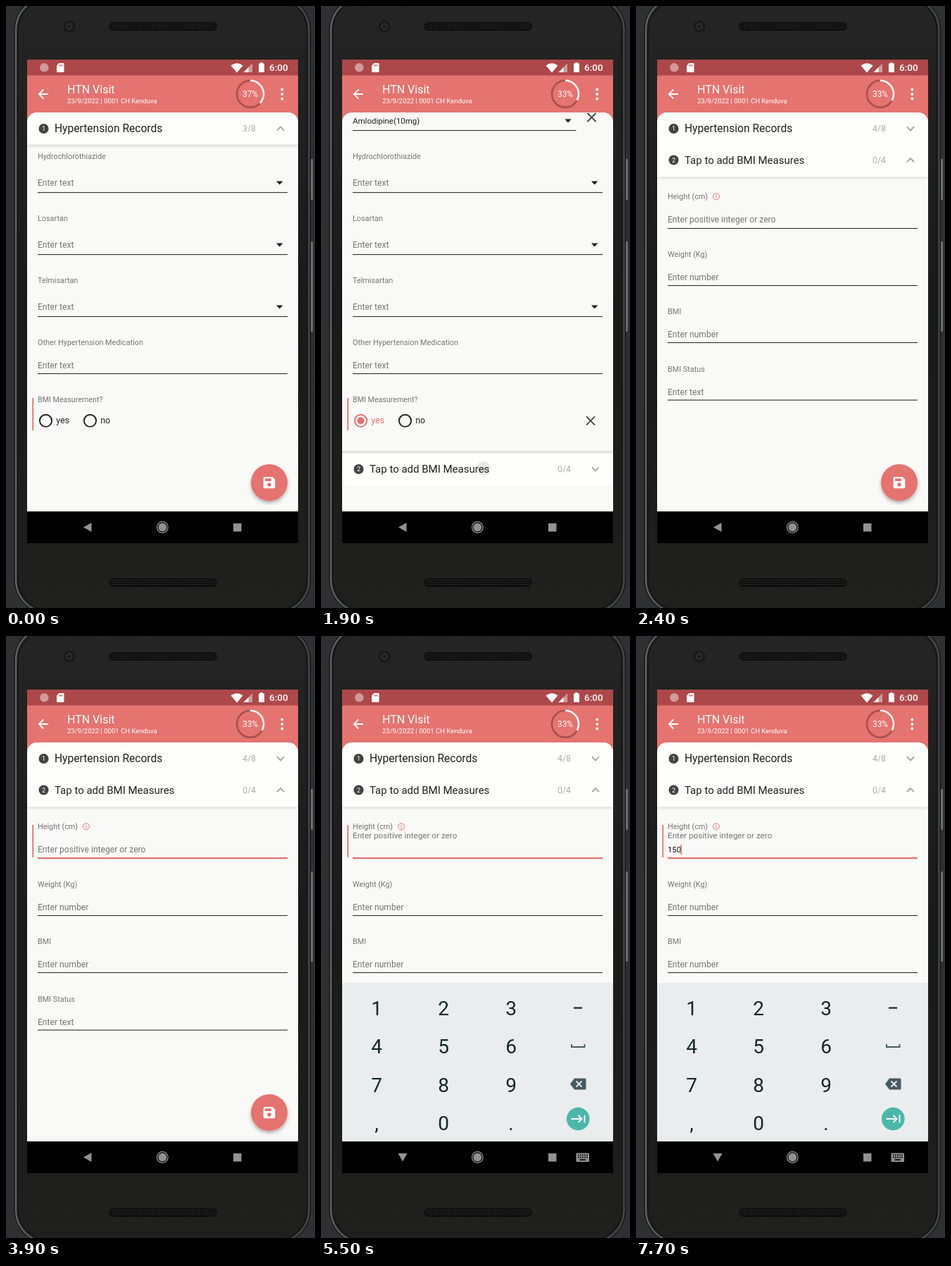
These frames come from a looping animation (439x854 px, 8 s). An HTML page:

```html
<!DOCTYPE html>
<html lang="en">
<head>
<meta charset="utf-8">
<title>Visit form</title>
<style>
  html, body { margin: 0; width: 100%; height: 100%; overflow: hidden; background: #2e3032; }
  svg { display: block; width: 100%; height: 100%; font-family: Roboto, Inter, sans-serif; }
</style>
</head>
<body>
<svg id="stage" viewBox="0 0 439 854"></svg>
<script>
const RED = '#e57370', INK = '#212121', GREY = '#757575', PALE = '#f9f9f8';

const text = (x, y, size, fill, str, extra = '') =>
  `<text x="${x}" y="${y}" font-size="${size}" fill="${fill}" ${extra}>${str}</text>`;
const rect = (x, y, w, h, fill, extra = '') =>
  `<rect x="${x}" y="${y}" width="${w}" height="${h}" fill="${fill}" ${extra}/>`;
const circle = (x, y, r, fill, extra = '') =>
  `<circle cx="${x}" cy="${y}" r="${r}" fill="${fill}" ${extra}/>`;
const path = (d, fill, extra = '') => `<path d="${d}" fill="${fill}" ${extra}/>`;
const line = (d, color, width, extra = '') =>
  path(d, 'none', `stroke="${color}" stroke-width="${width}" ${extra}`);
const group = (id, body, extra = '') => `<g id="${id}" ${extra}>${body}</g>`;
const mid = 'text-anchor="middle"';

const caret = (x, y) => path(`M${x - 4.7} ${y - 1.9}h9.4l-4.7 4.8z`, INK);
const cross = (x, y) => line(`M${x - 6} ${y - 6}l12 12m0 -12l-12 12`, '#424242', 1.8);
const rule = (y, to = 400) => rect(45, y, to - 45, 1.1, '#303030');
// Shadow cast below a header, with small rounded shoulders
const edge = y => path(`M30 ${y}h385v9q0-8-8-8H38q-8 0-8 8z`, '#fefefd') +
  rect(30, y, 385, 6, 'url(#shadow)');

function field(y, label, hint, hintY, lineY, id = '') {
  return text(45, y + 4, 10.85, GREY, label) +
    text(45, hintY + 4.2, 12.1, GREY, hint, id && `id="${id}"`) + rule(lineY);
}

function header(y, num, title, size, count) {
  return circle(53.5, y, 7, '#424242') + text(53.5, y + 3.2, 9, '#fff', num, mid) +
    text(69, y + 5.2, size, INK, title) +
    text(355, y + 4.3, 12.3, '#adadad', count, `id="count${num}" text-anchor="end"`) +
    line('M-5 2.6l5-5 5 5', '#a3a3a3', 1.9, `id="chev${num}"`);
}

function radio(x, name, label) {
  return circle(x, 588.3, 8.6, 'none', `id="${name}Ring" stroke="${INK}" stroke-width="1.9"`) +
    text(x + 14.7, 592.3, 12.3, INK, label, `id="${name}Text"`);
}

function speaker(y) {
  return rect(146, y, 154, 12, '#0d0d0d', 'rx="6"') + rect(147, y + 1, 152, 10, 'url(#mesh)', 'rx="5"');
}

function phone() {
  return rect(0, 0, 439, 854, '#2e3032') +
    rect(433, 217, 3, 58, '#6c6e70', 'rx="1"') + rect(433, 334, 3, 128, '#6c6e70', 'rx="1"') +
    rect(11.5, -14, 421.5, 876, '#101010', 'rx="48"') +
    rect(14, -12, 416.5, 872, 'url(#shell)', 'rx="46" stroke="url(#rim)" stroke-width="2.4"') +
    rect(17, -9, 410.5, 866, 'none', 'rx="43" stroke="#171717" stroke-width="2"') +
    circle(90, 29, 8.5, '#1a1a1a') + circle(90, 29, 5, '#2c2c2e') + circle(90, 29, 2.3, '#17181b') +
    speaker(23) + speaker(812);
}

function bars() {
  return rect(30, 76, 385, 23, '#ad484a') + rect(30, 98.5, 385, 85, RED) +
    circle(54.3, 87.3, 6.2, '#d29a9a') +
    path('M75.5 81h6a1 1 0 0 1 1 1v11a1 1 0 0 1-1 1H73a1 1 0 0 1-1-1V84.5z', '#fff') +
    line('M75.8 83v2.6m2-2.6v2.6m2-2.6v2.6', '#ad484a', 1) +
    path('M319.5 84.5q8.5-6.5 17 0l-8.5 10z', '#fff') +
    path('M350 81.5V94h-12.5z', '#d29a9b') + path('M344.5 87v7h-7z', '#fff') +
    path('M361.3 80h3.4v1.5h2.3V94h-8V81.5h2.3z', '#fff') +
    text(374, 92.3, 13.5, '#fff', '6:00', 'font-weight="500"') +
    line('M60 125H47m6.3-6.5l-6.5 6.5 6.5 6.5', '#fff', 1.8) +
    text(87, 123.6, 16, '#fff', 'HTN Visit') +
    text(87, 138.2, 9.5, '#fff', '23/9/2022 | 0001 CH Kenduva') +
    circle(347, 124.8, 19, 'none', 'stroke="#a9504f" stroke-width="2.6"') +
    circle(347, 124.8, 19, 'none', 'id="arc" pathLength="100" stroke="#fff" stroke-width="2.6" transform="rotate(-90 347 124.8)"') +
    text(347, 129, 11.9, '#fff', '', `id="percent" ${mid}`) +
    [118.5, 125, 131.5].map(y => circle(392.3, y, 2, '#fff')).join('');
}

function records() {
  const drugs = ['Hydrochlorothiazide', 'Losartan', 'Telmisartan'];
  return text(45, 166.8, 11.5, INK, 'Amlodipine(10mg)') + caret(351, 162.5) + rule(176, 362.5) + cross(384.5, 158) +
    drugs.map((d, i) => field(213 + 88 * i, d, 'Enter text', 250.5 + 88 * i, 264 + 88 * i) +
      caret(388.7, 250.5 + 88 * i)).join('') +
    field(477, 'Other Hypertension Medication', 'Enter text', 510, 521) +
    rect(37.3, 556, 1.8, 46, RED) + text(45, 562, 10.7, GREY, 'BMI Measurement?') +
    circle(56.5, 588.3, 19, RED, 'id="press"') +
    radio(56.5, 'yes', 'yes') + radio(119.5, 'no', 'no') +
    circle(56.5, 588.3, 5, RED, 'id="dot"') + group('clear', cross(383, 588.3)) +
    rect(30, 631, 385, 4, '#e3e3e2', 'id="split"');
}

function measures() {
  return edge(241) +
    field(270, 'Height (cm)', 'Enter positive integer or zero', 303, 315, 'hint') +
    circle(114, 270.3, 4.5, 'none', `stroke="${RED}" stroke-width="1"`) +
    line('M114 269.7v3m0-5v1.1', RED, 1) +
    field(351.5, 'Weight (Kg)', 'Enter number', 384.5, 396) +
    field(433, 'BMI', 'Enter number', 466, 477) +
    field(514.5, 'BMI Status', 'Enter text', 547.5, 558.5) +
    group('focus', rect(37.3, 268, 1.8, 46, RED) + rect(45, 314, 355, 2.1, RED)) +
    text(45, 287, 11.7, GREY, 'Enter positive integer or zero', 'id="float"') +
    text(45, 307.2, 11.3, '#111', '', 'id="typed"') +
    rect(0, 296, 1.7, 14, RED, 'id="cursor"');
}

function fab() {
  return circle(0, 0, 26, RED, 'filter="url(#lift)"') +
    path('M-6.3-8H4.5L8.3-4.2V6.3a2 2 0 0 1-2 2H-6.3a2 2 0 0 1-2-2V-6a2 2 0 0 1 2-2z', '#fff') +
    rect(-5.8, -5.8, 8.6, 3.8, RED) + circle(0, 3, 2.7, RED);
}

function keyboard() {
  const xs = [79, 174, 270], rows = ['123', '456', '789', ',0.'];
  const key = '#455a62';
  return rect(30, 492, 385, 240, '#e9eded') +
    rows.map((row, j) => [...row].map((c, i) =>
      text(xs[i], 538 + 54.4 * j, 28, '#13262c', c, mid)).join('')).join('') +
    rect(359, 526.5, 12, 2.2, '#13262c') +
    line('M356 579v4h18.5v-4', key, 1.9) +
    path('M360 627.5h15a1.5 1.5 0 0 1 1.5 1.5v13a1.5 1.5 0 0 1-1.5 1.5h-15l-6-8z', key) +
    line('M362.5 631.5l8 8m0-8l-8 8', '#e9eded', 1.8) +
    circle(365.3, 685, 16.3, '#4db6aa') +
    line('M355.5 685h15m-5-5l5 5-5 5m9-10.5v11', '#fff', 1.9);
}

function nav() {
  const c = '#92928f';
  const keys = [0, 1, 2, 3, 4].map(i => rect(365 + i * 3, 735.5, 1.8, 1.8, '#000') +
    rect(365 + i * 3, 738.7, 1.8, 1.8, '#000')).join('');
  return rect(30, 717, 385, 45, '#000') +
    path('M110 739.5l11.5-6.5v13z', c, 'id="back"') + path('M109.5 734h13L116 745.5z', c, 'id="down"') +
    circle(222.3, 739.5, 7.8, 'none', `stroke="${c}" stroke-width="1.3"`) + circle(222.3, 739.5, 5.9, c) +
    rect(323, 734, 11.5, 11.5, c) +
    group('switch', rect(362.5, 733.5, 18.5, 12.5, c, 'rx="1.5"') + keys + rect(367.5, 742.3, 8.5, 1.7, '#000'));
}

const stage = document.getElementById('stage');
stage.innerHTML = `<defs>
  <clipPath id="sheet"><path d="M30 717V165a14 14 0 0 1 14-14H401a14 14 0 0 1 14 14V717z"/></clipPath>
  <clipPath id="row"><rect x="30" y="634" width="385" height="46"/></clipPath>
  <linearGradient id="shell" x2="0" y2="1"><stop stop-color="#242524"/><stop offset=".5" stop-color="#191a19"/><stop offset="1" stop-color="#20201e"/></linearGradient>
  <linearGradient id="rim"><stop stop-color="#626463"/><stop offset=".1" stop-color="#4b4c4c"/><stop offset="1" stop-color="#474848"/></linearGradient>
  <linearGradient id="shadow" x2="0" y2="1"><stop stop-opacity=".13"/><stop offset="1" stop-opacity="0"/></linearGradient>
  <pattern id="mesh" width="3" height="3" patternUnits="userSpaceOnUse"><circle cx="1.5" cy="1.5" r=".8" fill="#343434"/></pattern>
  <filter id="lift" x="-30%" y="-30%" width="160%" height="170%"><feDropShadow dx="0" dy="3" stdDeviation="2.5" flood-opacity=".3"/></filter>
</defs>` + phone() + bars() +
  group('list', rect(30, 151, 385, 566, PALE) +
    group('records', records()) + group('measures', measures()) +
    group('head2', rect(30, 634.5, 385, 46.5, '#fefefb') + header(657, 2, 'Tap to add BMI Measures', 15, '0/4') +
      group('tap', circle(231, 656, 10, '#000', 'id="ripple"'), 'clip-path="url(#row)"')) +
    group('head1', group('shade', edge(196)) + path('M30 196.5V165a14 14 0 0 1 14-14H401a14 14 0 0 1 14 14V196.5z', '#fefefd') +
      header(174, 1, 'Hypertension Records', 15.6, '')) +
    group('fab', fab()) + group('keyboard', keyboard()), 'clip-path="url(#sheet)"') + nav();

const el = {};
stage.querySelectorAll('[id]').forEach(e => el[e.id] = e);
const set = (id, attrs) => { for (const k in attrs) el[id].setAttribute(k, attrs[k]); };
const fade = (id, v) => set(id, { opacity: +v });
const shift = (id, y) => set(id, { transform: `translate(0 ${y})` });

// Piecewise linear value from [time, value] pairs
function ramp(t, ...pts) {
  if (t <= pts[0][0]) return pts[0][1];
  for (let i = 1; i < pts.length; i++) {
    const [a, u] = pts[i - 1], [b, v] = pts[i];
    if (t < b) return u + (v - u) * (t - a) / (b - a);
  }
  return pts[pts.length - 1][1];
}

function draw(t) {
  const chosen = t >= 800, open = t >= 2100, focused = t >= 3900, typing = t >= 4000;

  el.percent.textContent = chosen ? '33%' : '37%';
  set('arc', { 'stroke-dasharray': `${chosen ? 33 : 37} 100` });
  el.count1.textContent = chosen ? '4/8' : '3/8';

  set('press', { r: ramp(t, [600, 0], [900, 19]), opacity: ramp(t, [900, .1], [1300, 0]) });
  set('yesRing', { stroke: chosen ? RED : INK });
  set('yesText', { fill: chosen ? RED : INK });
  set('dot', { r: chosen ? ramp(t, [900, 6.8], [1100, 5]) : 0 });
  fade('clear', chosen);
  const shown = ramp(t, [800, 0], [900, .28], [1100, 1]);
  fade('head2', shown);
  fade('split', shown);

  shift('head1', ramp(t, [900, 0], [1100, -12], [1300, -36], [1500, -50], [1700, -56],
    [2000, -56], [2100, -42], [2200, -12], [2300, 0]));
  fade('shade', !open);
  set('chev1', { transform: `translate(390 174) scale(1 ${open ? -1 : 1})` });

  set('ripple', { r: ramp(t, [1900, 10], [2000, 80], [2200, 220]),
    opacity: t < 1900 ? 0 : ramp(t, [1900, .09], [2000, .08], [2200, 0]) });
  set('chev2', { transform: `translate(390 657) scale(1 ${open ? 1 : -1})` });
  shift('head2', ramp(t, [2000, 0], [2100, -90], [2200, -340], [2300, -438.5]));
  fade('records', ramp(t, [1900, 1], [2100, 0]));
  fade('measures', ramp(t, [2200, 0], [2400, 1]));

  const size = t < 2000 ? ramp(t, [700, 1], [800, .5], [900, 0])
    : ramp(t, [2200, 0], [2300, .6], [2400, 1], [3900, 1], [4000, 0]);
  set('fab', { transform: `translate(374 676) scale(${size})` });

  fade('focus', focused);
  fade('hint', ramp(t, [3900, 1], [4000, .4], [4100, .03], [4200, 0]));
  fade('float', ramp(t, [3900, 0], [4000, .5], [4100, 1]));
  shift('keyboard', ramp(t, [3900, 225], [4000, 90], [4100, 0]));
  fade('back', !typing);
  fade('down', typing);
  fade('switch', typing);

  const n = (t >= 6100) + (t >= 6600) + (t >= 6700);
  el.typed.textContent = '150'.slice(0, n);
  set('cursor', { x: [45.2, 50.6, 56.7, 63.3][n] });
  const blinks = [[4000, 4400], [5000, 5500], [6000, 7200], [7700, 8000]];
  fade('cursor', blinks.some(([a, b]) => t >= a && t < b));
}

const LOOP = 8000, TICK = 100;
const start = performance.now();
function frame() {
  const t = (performance.now() - start) % LOOP;
  draw(Math.floor(t / TICK) * TICK);
  requestAnimationFrame(frame);
}
frame();
</script>
</body>
</html>
```
